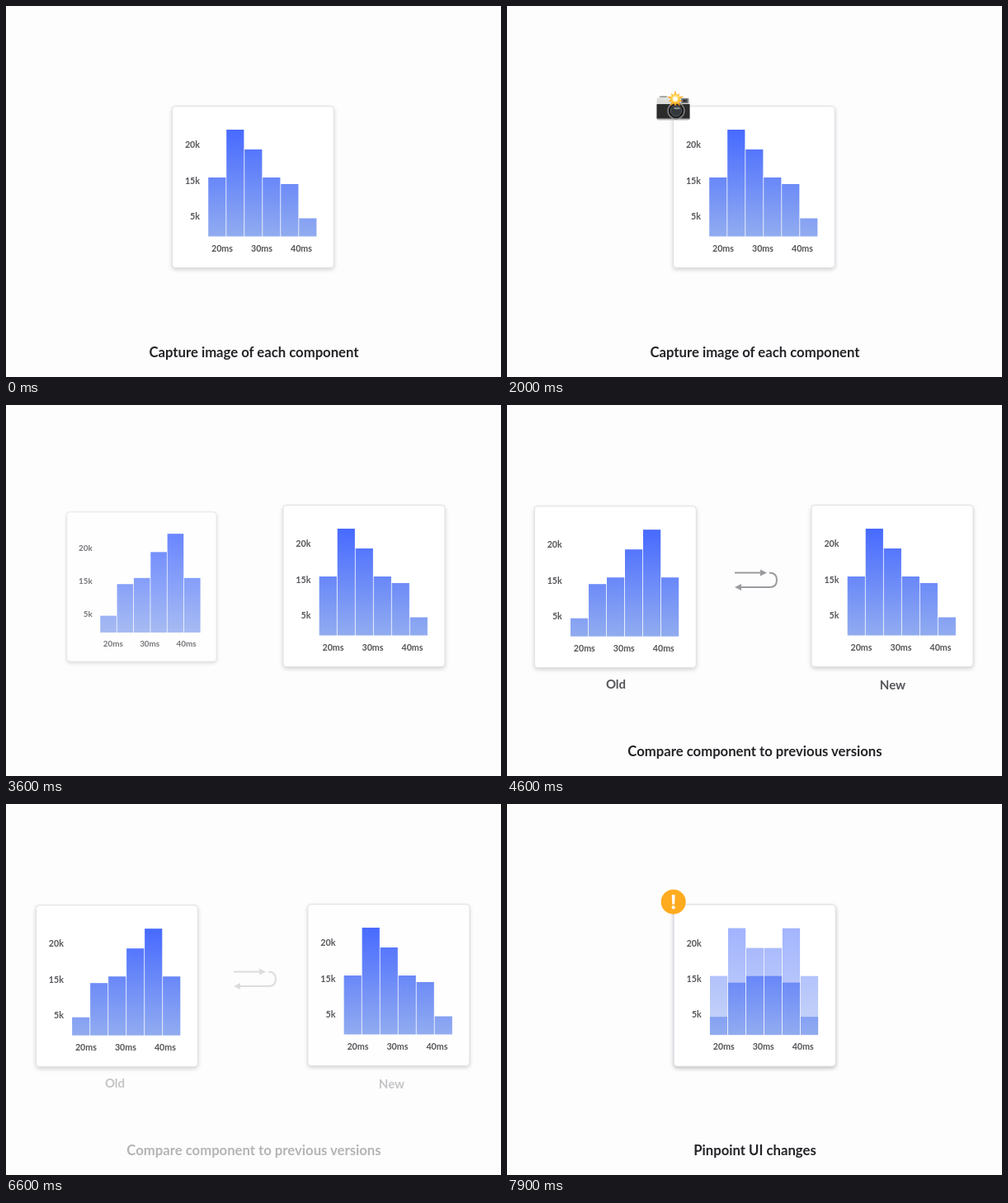
Recreate the animation shown at these times as an HTML page. Size 600 px wide and 450 px high, loop 8000 ms.

```html
<!DOCTYPE html>
<html lang="en">
<head>
<meta charset="utf-8">
<title>Component comparison</title>
<style>
  html, body { margin: 0; width: 100%; height: 100%; overflow: hidden; background: #fefdfe; }
  svg { display: block; width: 100vw; height: 100vh; }
  text { font-family: Lato, "Open Sans", sans-serif; font-weight: 700; }
  .caption { font-size: 16.7px; fill: #242428; text-anchor: middle; }
  .label { font-size: 15px; fill: #55555a; text-anchor: middle; }
  .axis { font-size: 10.7px; fill: #55555a; }
  .paper { fill: #fff; stroke: #dfdfe5; filter: drop-shadow(0 2.5px 2.5px rgba(0, 0, 0, .17)); }
</style>
</head>
<body>
<svg viewBox="0 0 600 450">
  <defs>
    <linearGradient id="blue" gradientUnits="userSpaceOnUse" x1="0" y1="150" x2="0" y2="280">
      <stop offset="0" stop-color="#476aff"/>
      <stop offset="1" stop-color="#92acf0"/>
    </linearGradient>
    <linearGradient id="silver" x2="0" y2="1">
      <stop offset="0" stop-color="#e4e4e2"/>
      <stop offset="1" stop-color="#b4b4b2"/>
    </linearGradient>
    <radialGradient id="burst">
      <stop offset=".1" stop-color="#fffbe0"/>
      <stop offset=".5" stop-color="#ffc93a"/>
      <stop offset="1" stop-color="#f58a12"/>
    </radialGradient>
  </defs>

  <g id="oldCard"></g>
  <g id="newCard"></g>

  <g id="camera">
    <rect x="185" y="109" width="9" height="4" rx="1" fill="#a9a9a7"/>
    <rect x="181.500" y="111" width="40" height="27.500" rx="2" fill="url(#silver)"/>
    <rect x="181.500" y="119" width="40" height="17.500" fill="#2b2b2c"/>
    <rect x="211" y="112" width="9" height="6" rx="1" fill="#77797a"/>
    <rect x="213" y="113.500" width="5" height="3" fill="#303338"/>
    <circle cx="205" cy="127" r="10" fill="#202123" stroke="#8b8c8d" stroke-width="1.300"/>
    <circle cx="205" cy="127" r="6.500" fill="#33383d" stroke="#56595c"/>
    <ellipse cx="206" cy="124" rx="4" ry="1.300" fill="#858b91"/>
    <polygon id="spark" fill="url(#burst)"/>
    <circle cx="204" cy="113" r="2.600" fill="#fff"/>
  </g>

  <g id="labels">
    <text class="label" x="132" y="344">Old</text>
    <text class="label" x="467.500" y="344.700">New</text>
    <g fill="none" stroke="#9b9b9f" stroke-width="2">
      <path d="M276 203.500H309M318 203.500C324 203.500 327 207 327 212.200S324 221 318 221H282"/>
      <path d="M307 199.500L315 203.500L307 207.500ZM284 217L276 221L284 225Z" fill="#9b9b9f" stroke="none"/>
    </g>
  </g>

  <text class="caption" id="capture" x="300.500" y="425.700">Capture image of each component</text>
  <text class="caption" id="compare" x="300.500" y="425.700">Compare component to previous versions</text>
  <text class="caption" id="pinpoint" x="300.500" y="425.700">Pinpoint UI changes</text>

  <g id="badge">
    <circle r="15" fill="#ffab1f"/>
    <path d="M-2 -8.500H2L1.400 3H-1.400Z" fill="#fff"/>
    <circle cy="6.700" r="2.100" fill="#fff"/>
  </g>
</svg>
<script>
  const LOOP = 8000, STEP = 100;
  const CENTER = { x: 299.5, y: 219.5 };
  const BAR_TOPS = [208, 150, 174, 208, 216, 257.5];
  const $ = id => document.getElementById(id);

  function cardMarkup(tops) {
    const bars = tops.map((top, i) =>
      `<rect x="${245.2 + i * 22}" y="${top}" width="21.2" height="${279.5 - top}" fill="url(#blue)"/>`);
    const yLabels = ['20k', '15k', '5k'].map((s, i) =>
      `<text class="axis" x="235" y="${172.3 + i * 43.2}" text-anchor="end">${s}</text>`);
    const xLabels = ['20ms', '30ms', '40ms'].map((s, i) =>
      `<text class="axis" x="${262 + i * 48}" y="297.7" text-anchor="middle">${s}</text>`);
    return '<rect class="paper" x="201.5" y="121.5" width="196" height="196" rx="4"/><g class="chart">' +
      [...bars, ...yLabels, ...xLabels].join('') + '</g>';
  }

  function starPoints(cx, cy, spikes, outer, inner) {
    return Array.from({ length: spikes * 2 }, (_, i) => {
      const a = i * Math.PI / spikes - Math.PI / 2;
      const r = i % 2 ? inner : outer - (i % 4 ? 2 : 0);
      return `${cx + r * Math.cos(a)},${cy + r * Math.sin(a)}`;
    }).join(' ');
  }

  $('oldCard').innerHTML = cardMarkup([...BAR_TOPS].reverse());
  $('newCard').innerHTML = cardMarkup(BAR_TOPS);
  $('spark').setAttribute('points', starPoints(204, 113, 10, 10.5, 5.5));
  const newChart = $('newCard').querySelector('.chart');

  const ramp = (t, from, to) => Math.min(1, Math.max(0, (t - from) / (to - from)));
  const mix = (a, b, p) => a + (b - a) * p;
  const easeInOut = p => p < .5 ? 4 * p ** 3 : 1 - 4 * (1 - p) ** 3;
  const easeOutBack = p => 1 + 2.9 * (p - 1) ** 3 + 1.9 * (p - 1) ** 2;

  function show(el, opacity) {
    el.setAttribute('opacity', opacity);
    el.style.display = opacity > 0 ? '' : 'none';
  }

  function place(el, dx, dy, scale = 1) {
    const { x, y } = CENTER;
    el.setAttribute('transform',
      `translate(${x + dx} ${y + dy}) scale(${scale}) translate(${-x} ${-y})`);
  }

  function render(t) {
    const split = easeInOut(ramp(t, 3220, 3820));
    const merge = easeInOut(ramp(t, 6500, 7100));

    place($('oldCard'), mix(-168.2 * split, .7, merge), mix(1.2 * split, .7, merge), mix(.62, 1, split));
    show($('oldCard'), split);
    place($('newCard'), mix(167.5 * split, .8, merge), .6 * merge);
    show($('newCard'), 1 - .5 * merge);

    const flash = .25 * ramp(t, 1200, 1400) * (1 - ramp(t, 1400, 1650));
    newChart.setAttribute('opacity', 1 - flash);

    const leave = 1 - ramp(t, 2900, 3200);
    const compare = ramp(t, 3800, 4200) * (1 - ramp(t, 6400, 6700));
    show($('camera'), ramp(t, 1000, 1300) * leave);
    show($('capture'), leave);
    show($('compare'), compare);
    show($('labels'), compare);
    show($('pinpoint'), ramp(t, 6700, 7050));

    const pop = ramp(t, 7300, 7700);
    show($('badge'), pop > 0 ? 1 : 0);
    $('badge').setAttribute('transform', `translate(201.7 118.7) scale(${easeOutBack(pop)})`);
  }

  function frame(now) {
    render(Math.floor(now % LOOP / STEP) * STEP);
    requestAnimationFrame(frame);
  }
  render(0);
  requestAnimationFrame(frame);
</script>
</body>
</html>
```
